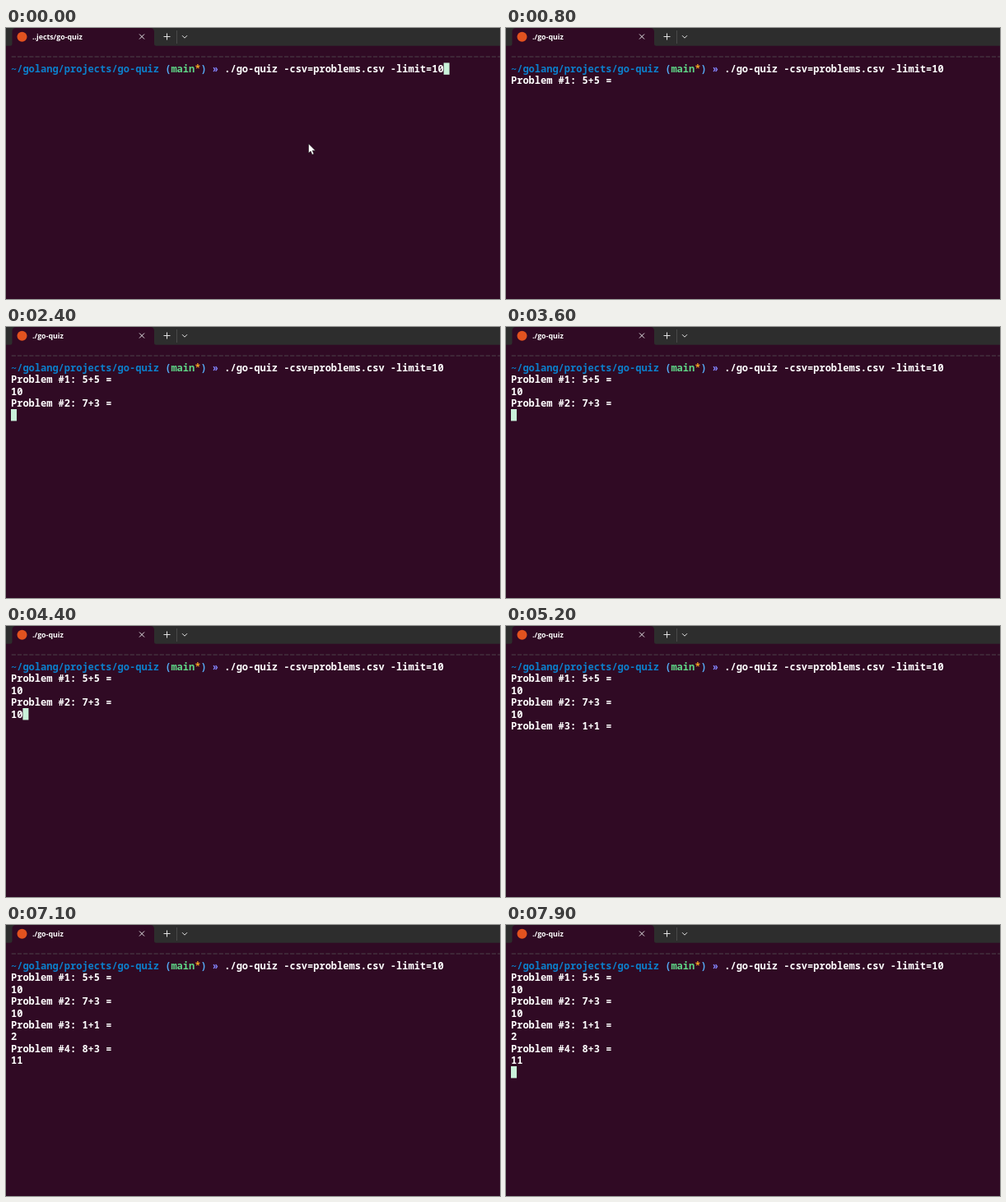
These frames come from a looping animation (600x330 px, 8 s). An HTML page:

```html
<!DOCTYPE html>
<html lang="en">
<head>
<meta charset="utf-8">
<title>go-quiz</title>
<style>
  html, body { margin: 0; width: 100%; height: 100%; overflow: hidden; background: #300a24; }
  svg { display: block; width: 600px; height: 330px; }
  text { white-space: pre; }
  .term { font: 600 12px "Noto Sans Mono", "DejaVu Sans Mono", monospace; fill: #fff; }
  .title { font: 700 8.8px "Open Sans", "Noto Sans", sans-serif; fill: #fff; }
  .icon { fill: none; stroke: #e4e4e4; stroke-width: 1; }
  .path { fill: #0c7fcb; }
  .paren { fill: #55a8f2; }
  .branch { fill: #5fd787; }
  .dirty { fill: #f5a623; }
  .arrow { fill: #8080f5; }
</style>
</head>
<body>
<svg viewBox="0 0 600 330">
  <rect width="600" height="330" fill="#300a24"/>
  <rect width="600" height="21.700" fill="#2d2d2d"/>
  <path d="M5 22q2.500 0 2.500-3V5q0-5 5-5H175q5 0 5 5V19q0 3 2.500 3z" fill="#300a24"/>
  <circle cx="19.500" cy="10.700" r="6" fill="#e2521f"/>
  <text id="title" class="title" x="32" y="14"></text>
  <path class="icon" d="M162 7.500l6 6m0-6l-6 6"/>
  <path class="icon" d="M191.500 10.500h8m-4-4v8"/>
  <path d="M207.500 3v16" stroke="#4a4a4a"/>
  <path class="icon" d="M214 9.200l3 3l3-3"/>

  <path d="M6.700 35H600" stroke="#4d434b" stroke-dasharray="5.200 2"/>
  <text class="term" x="6" y="54"><tspan class="path">~/golang/projects/go-quiz</tspan> <tspan class="paren">(</tspan><tspan class="branch">main</tspan><tspan class="dirty">*</tspan><tspan class="paren">)</tspan> <tspan class="arrow">»</tspan> ./go-quiz -csv=problems.csv -limit=10</text>
  <g id="output" class="term"></g>
  <rect id="cursor" width="7" height="14.400" fill="#c9f2da"/>
  <path id="mouse" d="M367.500 141v11.300l2.600-2.400l1.800 4.300l2-.9l-1.800-4.100h3.600z"
        fill="#fff" stroke="#111" stroke-width=".5"/>
</svg>
<script>
  const LOOP = 8000, BLINK = 1060;
  const LEFT = 6, CHAR = 7.2, ROW = 14.4, BASE = 54;
  const COMMAND_END = 73;

  // Output in order: [time, text added]
  const events = [
    [400, "Problem #1: 5+5 =\n"],
    [1400, "1"], [1600, "0"],
    [2000, "\nProblem #2: 7+3 =\n"],
    [3900, "1"], [4100, "0"],
    [4700, "\nProblem #3: 1+1 =\n"],
    [5600, "2"],
    [5900, "\nProblem #4: 8+3 =\n"],
    [6600, "1"], [6800, "1"],
    [7300, "\n"]
  ];

  const byId = id => document.getElementById(id);
  const output = byId("output"), cursor = byId("cursor");
  const rows = Array.from({ length: 9 }, (_, i) => {
    const row = document.createElementNS("http://www.w3.org/2000/svg", "text");
    row.setAttribute("x", LEFT);
    row.setAttribute("y", BASE + (i + 1) * ROW);
    return output.appendChild(row);
  });

  function show(el, on) {
    el.setAttribute("visibility", on ? "visible" : "hidden");
  }

  function draw(now) {
    const t = now % LOOP;
    const running = t >= events[0][0];
    const text = events.filter(e => e[0] <= t).map(e => e[1]).join("");
    const lines = text.split("\n");
    rows.forEach((row, i) => {
      const line = lines[i] || "";
      if (row.textContent !== line) row.textContent = line;
    });

    const line = running ? lines.length : 0;
    const column = running ? lines[line - 1].length : COMMAND_END;
    cursor.setAttribute("x", LEFT + column * CHAR);
    cursor.setAttribute("y", 42.4 + line * ROW);
    show(cursor, t % BLINK < BLINK / 2);
    show(byId("mouse"), !running);
    byId("title").textContent = running ? "./go-quiz" : "..jects/go-quiz";
  }

  function tick() {
    draw(performance.now());
    requestAnimationFrame(tick);
  }
  tick();
</script>
</body>
</html>
```
